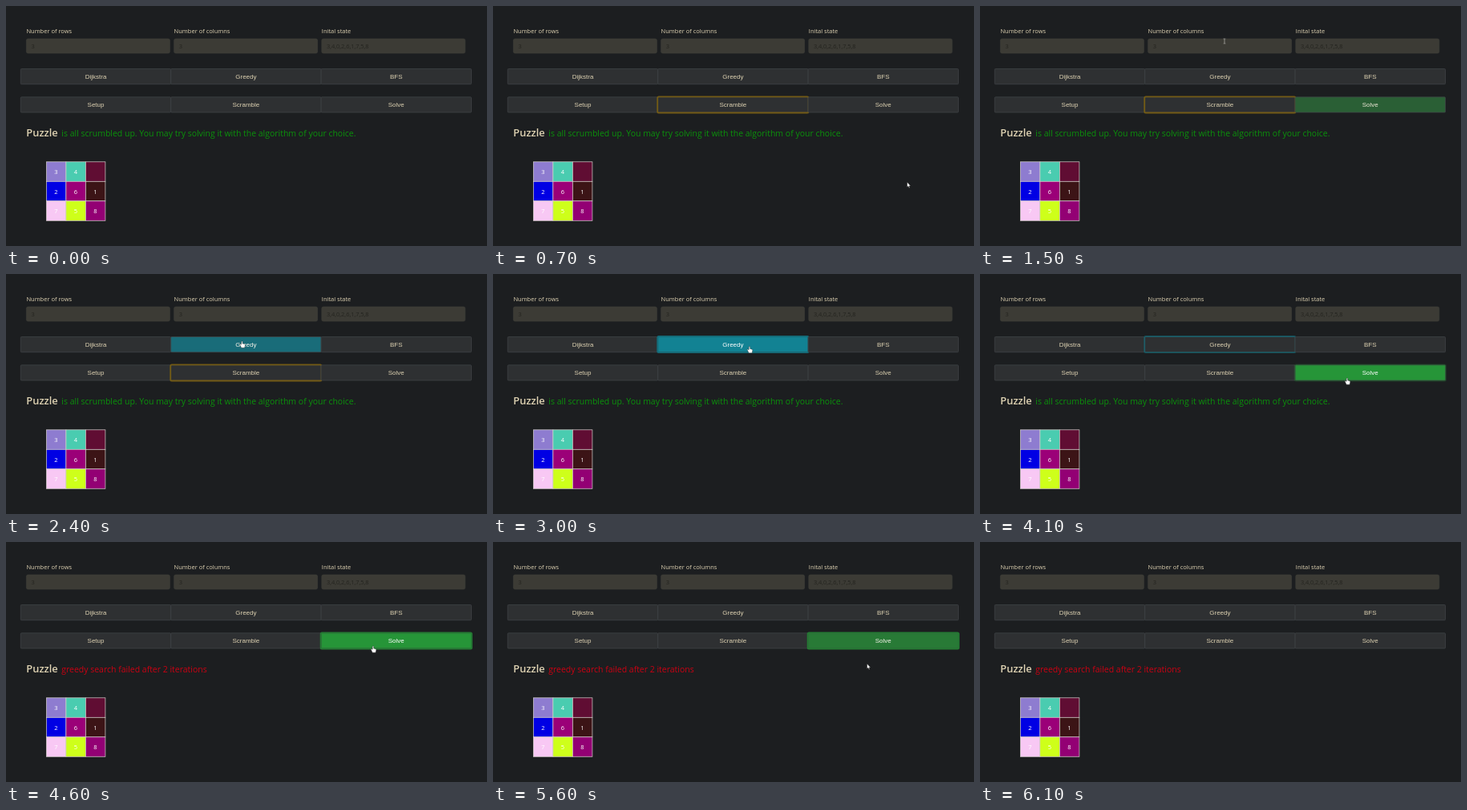
These frames come from a looping animation (600x300 px, 6200 ms). An HTML page:

```html
<!DOCTYPE html>
<html lang="en">
<head>
<meta charset="utf-8">
<title>Sliding puzzle solver</title>
<style>
  html, body { margin: 0; width: 100%; height: 100%; overflow: hidden; background: #1c1e20; }
  svg { display: block; width: 100vw; height: 100vh; font-family: "Open Sans", "Noto Sans", sans-serif; fill: #ded2b2; }
  .button { font: 8px "Liberation Sans", Arial, sans-serif; text-anchor: middle; }
  .label { font-size: 7.5px; }
  .value { font-size: 7.4px; fill: #24241f; }
  .tile { font-size: 7.5px; text-anchor: middle; fill: #fff; }
</style>
</head>
<body>
<svg id="stage" viewBox="0 0 600 300">
  <g id="form"></g>
  <g id="buttons"></g>
  <text x="25.3" y="163" font-size="12.9" font-weight="600">Puzzle</text>
  <text id="message" x="69.3" y="163" font-size="10.48"></text>
  <g id="board"></g>
  <g id="cursor" stroke-linejoin="round">
    <path id="arrow" d="M0 0V6.6L1.5 5.3L2.5 7.5L3.5 7L2.6 4.9H4.6Z" fill="#fff" stroke="#111" stroke-width=".5"/>
    <path id="hand" d="M-.8-3.6Q0-4.4.7-3.6V-1L3.2-.3Q4-.1 3.8 1L3.1 4.2H-.9L-3-.2Q-2.6-1.2-.8.3Z" fill="#fff" stroke="#222" stroke-width=".4"/>
    <path id="beam" d="M-1.3-3H-.3L0-2.7L.3-3H1.3M0-2.7V2.7M-1.3 3H-.3L0 2.7L.3 3H1.3" fill="none" stroke="#b5b5b0" stroke-width=".7"/>
  </g>
</svg>
<script>
const LOOP = 6200, STEP = 100, FADE = 150;
const $ = id => document.getElementById(id);

function add(parent, tag, attributes, text = "") {
  const node = document.createElementNS("http://www.w3.org/2000/svg", tag);
  for (const [name, value] of Object.entries(attributes)) node.setAttribute(name, value);
  node.textContent = text;
  return parent.appendChild(node);
}

const fields = [["Number of rows", "3"], ["Number of columns", "3"], ["Inital state", "3,4,0,2,6,1,7,5,8"]];
fields.forEach(([label, value], i) => {
  const x = 25.4 + i * 184.2;
  add($("form"), "text", { x, y: 34, class: "label" }, label);
  add($("form"), "rect", { x, y: 41, width: 179, height: 18, rx: 2, fill: "#3c3b35", stroke: "#41403a", "stroke-width": .6 });
  add($("form"), "text", { x: x + 6.2, y: 52.8, class: "value" }, value);
});

const buttons = {};
function addButton(name, column, row) {
  const x = 18.3 + column * 187.4, y = 78.5 + row * 35.3;
  const box = { x, y, width: 187.4, height: 19.2, rx: 1 };
  const face = add($("buttons"), "rect", { ...box, stroke: "#43474a", "stroke-width": .7 });
  const label = add($("buttons"), "text", { x: x + 93.7, y: y + 12.5, class: "button" }, name);
  const ring = add($("buttons"), "rect", { ...box, x: x - .5, y: y - .5, width: 188.4, height: 20.2, rx: 1.6, fill: "none", "stroke-width": 1.8 });
  buttons[name] = { face, label, ring };
}
["Dijkstra", "Greedy", "BFS"].forEach((name, i) => addButton(name, i, 0));
["Setup", "Scramble", "Solve"].forEach((name, i) => addButton(name, i, 1));

const tiles = [
  ["3", "#8e7cd0"], ["4", "#4accb0"], ["", "#600d33"],
  ["2", "#0000e4"], ["6", "#9b0078"], ["1", "#3c1416"],
  ["7", "#f8c8f4"], ["5", "#ceff1a"], ["8", "#930074"]
];
tiles.forEach(([digit, fill], i) => {
  const x = 50.4 + i % 3 * 24.5, y = 194.8 + Math.floor(i / 3) * 24.5;
  add($("board"), "rect", { x, y, width: 24.5, height: 24.5, fill, stroke: "#d6d0cc", "stroke-width": .7 });
  add($("board"), "text", { x: x + 12, y: y + 15.6, class: "tile" }, digit);
});

// Pointer path as [time, x, y].
const path = [
  [100, 500, 262], [400, 511, 236], [700, 516.5, 220], [900, 511, 196], [1100, 498, 146],
  [1300, 468, 122], [1400, 415, 82], [1500, 305, 44], [1700, 304, 46], [1900, 303, 48],
  [2300, 296, 84], [2400, 294.5, 88], [2900, 295, 89], [3100, 345, 100], [3400, 445, 128],
  [3600, 457.5, 137], [4000, 458, 134], [5500, 458, 134], [5700, 475, 170], [6000, 500, 262]
];
function pointerAt(t) {
  const i = Math.max(1, path.findIndex(point => point[0] >= t));
  const [t0, x0, y0] = path[i - 1], [t1, x1, y1] = path[i];
  const p = (t - t0) / (t1 - t0);
  return [x0 + (x1 - x0) * p, y0 + (y1 - y0) * p];
}

const clamp = value => Math.max(0, Math.min(1, value));
const during = (t, from, to) => clamp((t - from) / FADE) - clamp((t - to) / FADE);
const mix = (a, b, p) => `rgb(${a.map((v, i) => Math.round(v + (b[i] - v) * p))})`;

const FACE = [46, 48, 50], TEXT = [222, 210, 178], WHITE = [255, 255, 255];
const GOLD = [140, 108, 18], TEAL = [18, 130, 147], GREEN = [38, 149, 56];

function paintButton(name, color, hover, focus) {
  const { face, label, ring } = buttons[name];
  face.setAttribute("fill", mix(FACE, color, hover));
  label.setAttribute("fill", mix(TEXT, WHITE, hover));
  ring.setAttribute("stroke", mix([28, 30, 32], color, .78));
  ring.setAttribute("opacity", focus);
}

function draw(t) {
  paintButton("Dijkstra", TEAL, 0, 0);
  paintButton("BFS", GREEN, 0, 0);
  paintButton("Setup", TEAL, 0, 0);
  paintButton("Scramble", GOLD, 0, t < 100 ? 0 : 1 - during(t, 2600, LOOP));
  paintButton("Greedy", TEAL, during(t, 2290, 3050), during(t, 2600, 4050));
  paintButton("Solve", GREEN, during(t, 1110, 1420) + during(t, 3250, 5560), during(t, 4050, 5850));

  const failed = t >= 4300;
  $("message").textContent = failed
    ? "greedy search failed after 2 iterations"
    : "is all scrumbled up. You may try solving it with the algorithm of your choice.";
  $("message").setAttribute("fill", failed ? "#cc0012" : "#0b920b");

  const visible = t >= 100 && t <= 6000;
  $("cursor").style.display = visible ? "" : "none";
  if (!visible) return;
  const [x, y] = pointerAt(t);
  const shape = y > 41 && y < 59 ? "beam"
    : (y > 78 && y < 98) || (y > 113 && y < 138) ? "hand" : "arrow";
  for (const id of ["arrow", "hand", "beam"]) $(id).style.display = id === shape ? "" : "none";
  $("cursor").setAttribute("transform", `translate(${x} ${y})`);
}

const start = performance.now();
function tick() {
  const t = (performance.now() - start) % LOOP;
  draw(Math.floor(t / STEP) * STEP);
  requestAnimationFrame(tick);
}
tick();
</script>
</body>
</html>
```
